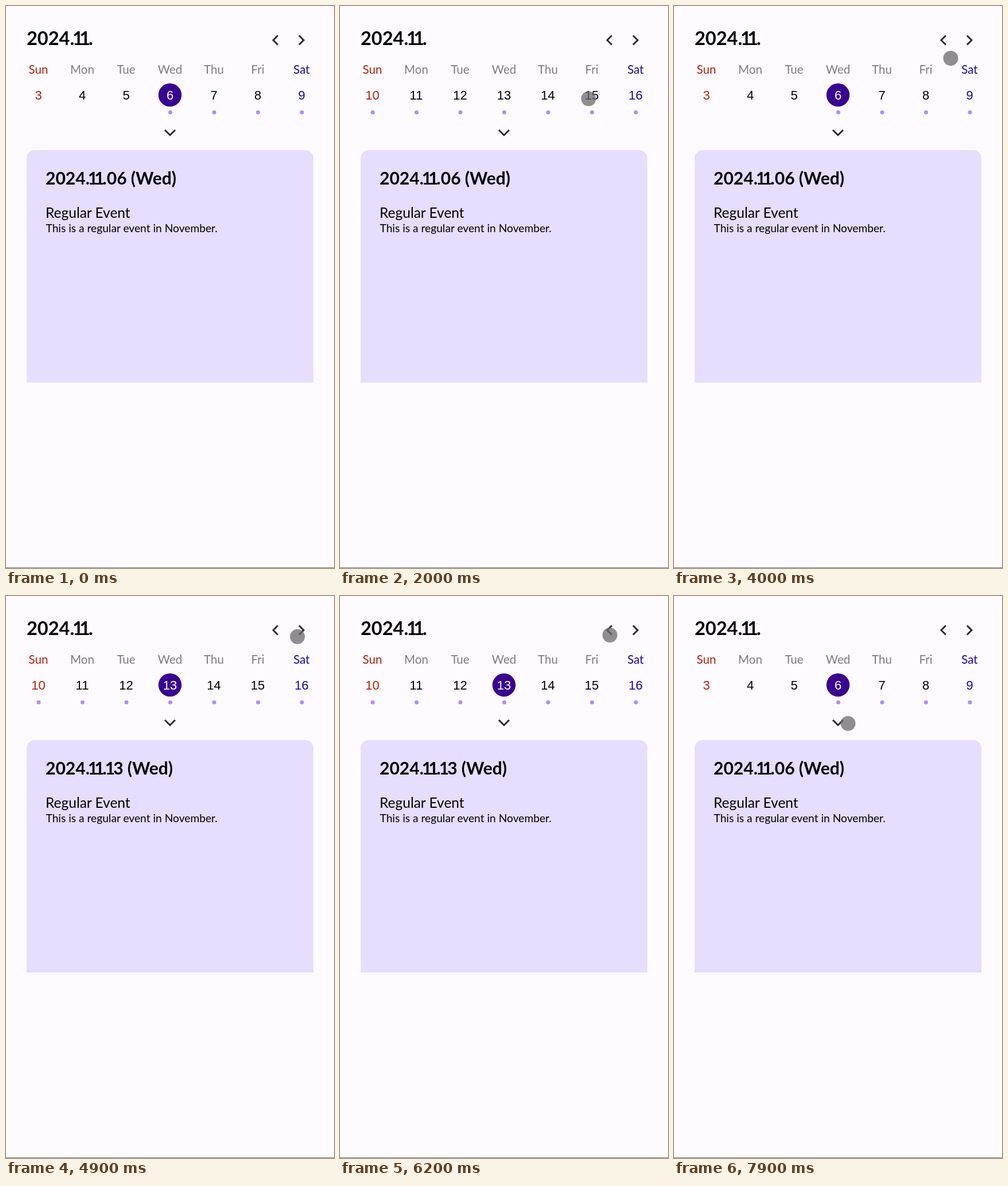
Animation, 572 px wide and 979 px high, one loop 8000 ms. Source, as an HTML page:

```html
<!DOCTYPE html>
<html lang="en">
<head>
<meta charset="utf-8">
<title>Week calendar</title>
<style>
  html, body { margin: 0; width: 100%; height: 100%; overflow: hidden; background: #fdfbff; }
  svg { display: block; width: 100vw; height: 100vh; }
  text { font-family: Lato, sans-serif; }
  .bold { font-weight: 700; }
  .column text { text-anchor: middle; }
  .name { font-size: 20.5px; fill: #7d7b80; }
  .day { font-family: "Liberation Sans", Arial, sans-serif; font-size: 22px; }
  .sunday text { fill: #b3200a; }
  .saturday text { fill: #1a0aa0; }
  .selected .day { fill: #fff; }
  .disc { fill: #390092; }
  .dot { fill: #b28bf6; }
  .icon { fill: none; stroke: #2b292e; stroke-width: 3; }
</style>
</head>
<body>
<svg viewBox="0 0 572 979">
  <text id="month" class="bold" x="36" y="68" font-size="32.5"></text>
  <path class="icon" d="M474 51.5l-8 8 8 8M511 51.5l8 8-8 8M277 216l9 9 9-9"/>
  <g id="week"></g>
  <path d="M36 656V265a14 14 0 0 1 14-14h472a14 14 0 0 1 14 14V656z" fill="#e6ddff"/>
  <text id="date" class="bold" x="69" y="311" font-size="30"></text>
  <text x="69" y="369" font-size="24.5">Regular Event</text>
  <text x="69.5" y="394" font-size="19.2">This is a regular event in November.</text>
  <path d="M0 978.5H572" stroke="#777579"/>
  <circle id="pointer" r="13" fill="#696869" fill-opacity=".75"/>
</svg>
<script>
const LOOP = 8000, STEP = 100;
const DAYS = ['Sun', 'Mon', 'Tue', 'Wed', 'Thu', 'Fri', 'Sat'];
const WEDNESDAY = 3, FIRST_EVENT = 6;

// Swipe left, swipe right, next arrow, previous arrow
const PAGE_TURNS = [1800, 3300, 4700, 6400];

// The pointer glides to each stop and slows down as it arrives
const STOPS = [
  { t: 800, x: 565, y: 140 },
  { t: 2000, x: 433.5, y: 161.5 },
  { t: 2700, x: 78, y: 164 },
  { t: 3000, x: 253.5, y: 169 },
  { t: 4000, x: 482.5, y: 91 },
  { t: 5600, x: 510.5, y: 69 },
  { t: 6400, x: 470, y: 68 },
  { t: 7100, x: 422.5, y: 94.5 },
  { t: 7900, x: 303.5, y: 222 }
];

const $ = id => document.getElementById(id);
const pad = n => String(n).padStart(2, '0');
const easeOut = k => 1 - (1 - k) ** 3;

// The heading figures are proportional: tighten both sides of every 1
function setHeading(id, string) {
  const isOne = c => c === '1';
  const dx = [...string].map((c, i) => -0.1 * (isOne(c) + isOne(string[i - 1])) + 'em');
  $(id).setAttribute('dx', dx.join(' '));
  $(id).textContent = string;
}

function column(name, i, first, selected) {
  const x = 56.5 + 76.5 * i, day = first + i;
  const active = selected && i === WEDNESDAY;
  const kind = { Sun: 'sunday', Sat: 'saturday' }[name] || '';
  return `<g class="column ${kind} ${active ? 'selected' : ''}">
    <text class="name" x="${x}" y="118">${name}</text>
    ${active ? `<circle class="disc" cx="${x}" cy="155" r="20.2"/>` : ''}
    <text class="day" x="${x}" y="163">${day}</text>
    ${day >= FIRST_EVENT ? `<circle class="dot" cx="${x + .5}" cy="185.2" r="3.5"/>` : ''}
  </g>`;
}

let shownTurns;
function showWeek(turns) {
  if (turns === shownTurns) return;
  shownTurns = turns;
  const second = turns % 2 === 1;
  const byArrow = turns > 2; // swiping keeps the old selection, arrows move it
  const first = second ? 10 : 3;
  const chosen = second && byArrow ? 13 : 6;
  const selected = chosen === first + WEDNESDAY;
  $('week').innerHTML = DAYS.map((name, i) => column(name, i, first, selected)).join('');
  setHeading('date', `2024.11.${pad(chosen)} (Wed)`);
}

function movePointer(t) {
  const next = STOPS.findIndex(stop => stop.t >= t);
  const to = STOPS[next], from = STOPS[Math.max(next - 1, 0)];
  const k = easeOut((t - from.t) / (to.t - from.t || 1));
  $('pointer').setAttribute('cx', from.x + (to.x - from.x) * k);
  $('pointer').setAttribute('cy', from.y + (to.y - from.y) * k);
}

function draw() {
  const t = Math.floor(performance.now() % LOOP / STEP) * STEP;
  const visible = t >= STOPS[0].t;
  showWeek(PAGE_TURNS.filter(turn => turn <= t).length);
  $('pointer').style.display = visible ? '' : 'none';
  if (visible) movePointer(t);
  requestAnimationFrame(draw);
}

setHeading('month', '2024.11.');
draw();
</script>
</body>
</html>
```
